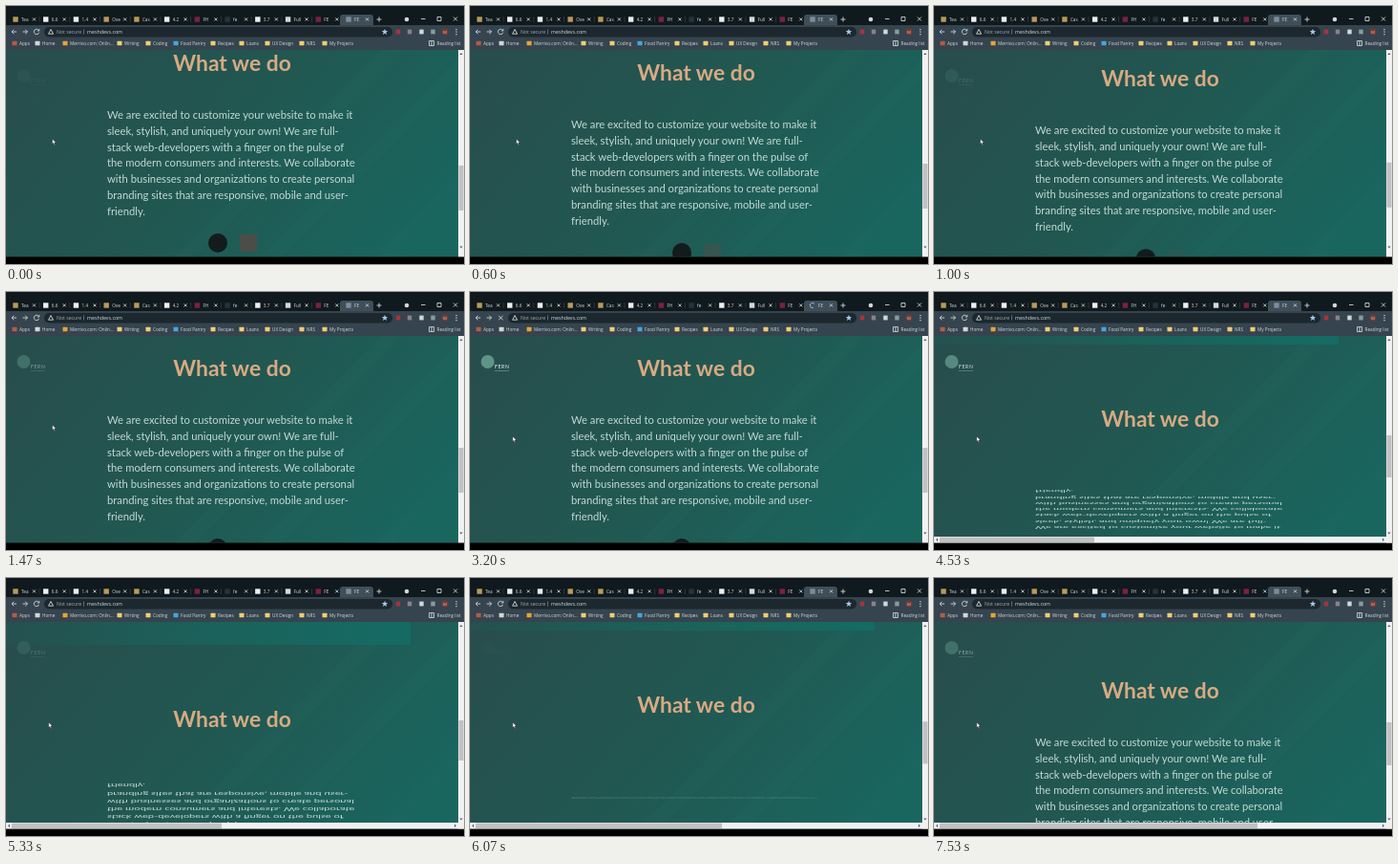
An HTML page for the animation above (7670 ms loop, 480x270 px).

```html
<!DOCTYPE html>
<html lang="en">
<head>
<meta charset="utf-8">
<title>What we do</title>
<style>
html, body { margin: 0; width: 100%; height: 100%; overflow: hidden; background: #000; }
svg { display: block; width: 100vw; height: 100vh; }
text { font-family: Lato, "Open Sans", sans-serif; white-space: pre; }
#chrome text { font: 4.7px "Open Sans", Roboto, sans-serif; fill: #d3dade; }
.line { fill: none; stroke: #cdd5d9; stroke-width: .9; }
</style>
</head>
<body>
<svg viewBox="0 0 480 270">
  <defs>
    <linearGradient id="teal" gradientUnits="userSpaceOnUse" x1="60" y1="20" x2="390" y2="300">
      <stop offset="0" stop-color="#274e4d"/>
      <stop offset=".5" stop-color="#215852"/>
      <stop offset="1" stop-color="#19665f"/>
    </linearGradient>
    <linearGradient id="edge">
      <stop offset="0" stop-color="#156b63" stop-opacity=".1"/>
      <stop offset="1" stop-color="#156b63"/>
    </linearGradient>
    <clipPath id="view"><rect y="46" width="474" height="216.5"/></clipPath>
  </defs>
  <rect width="480" height="270"/>
  <g clip-path="url(#view)">
    <rect y="46" width="474" height="217" fill="url(#teal)"/>
    <path d="M180 270L410 40M270 270L500 40M390 270L500 160" stroke="#2c766b" stroke-width="16" opacity=".12"/>
    <g id="page">
      <rect y="-278" width="424" height="200" fill="url(#edge)"/>
      <text x="237" y="8" text-anchor="middle" font-size="22.8" font-weight="700" fill="#d8aa83">What we do</text>
      <g id="copy" font-size="11.25" fill="#c3d9d5"></g>
      <circle cx="222" cy="188" r="10" fill="#131c1c"/>
      <rect id="badge" x="245" y="179" width="18" height="18" fill="#74403f"/>
    </g>
    <g id="brand">
      <circle cx="18.5" cy="73" r="7" fill="#5f9488"/>
      <text x="26" y="80" font-size="5" letter-spacing=".7" fill="#fff">FERN</text>
      <text x="26" y="82.6" font-size="1.9" fill="#c9dad5">web development</text>
    </g>
  </g>
  <rect x="474" y="46" width="6" height="216.5" fill="#f1f1f1"/>
  <path d="M475.3 51l1.7-2 1.7 2zM475.3 251.5l1.7 2 1.7-2z" fill="#606060"/>
  <rect id="vbar" x="474.5" width="5" fill="#c1c1c1"/>
  <g id="across">
    <rect y="256" width="480" height="6.5" fill="#f1f1f1"/>
    <path d="M4 257.5l-2 1.7 2 1.7zM470 257.5l2 1.7-2 1.7z" fill="#606060"/>
    <rect id="hbar" x="6" y="256.5" height="5.5" fill="#c1c1c1"/>
  </g>
  <g id="chrome">
    <rect width="480" height="20" fill="#10191d"/>
    <rect y="20" width="480" height="26" fill="#35444e"/>
    <path d="M350 20v-8q0-3 3-3h29q3 0 3 3v8z" fill="#3f4f5a"/>
    <rect x="40" y="22" width="365" height="10.5" rx="5" fill="#1c282e"/>
    <path class="line" d="M11 27H6m2.3-2.3L6 27l2.3 2.3M17.5 27h5m-2.3-2.3L22.5 27l-2.3 2.3"/>
    <path id="reload" class="line" d="M34.3 25.5a2.7 2.7 0 1 0 .3 2.3M34.8 24v2h-2"/>
    <path id="stop" class="line" d="M30 24.8l4.5 4.500m0-4.500L30 29.300"/>
    <path class="line" d="M47 24.500l2.500 4.700h-5z" stroke-width=".7"/>
    <text x="53" y="28.900" style="font-size:5.200px;fill:#a4adb2">Not secure</text>
    <path class="line" d="M81.500 24.500v5" style="stroke:#66737a"/>
    <text x="85" y="28.900" style="font-size:5.300px">meshdevs.com</text>
    <path d="M397 23.800l.9 2.200 2.300.1-1.800 1.500.6 2.300-2-1.300-2 1.300.6-2.300-1.800-1.500 2.300-.1z" fill="#a9c9ee"/>
    <path class="line" d="M388.500 14h5m-2.500-2.500v5M435 13.500h4.500M452 11.500h4v4h-4zM469 11.500l4 4m0-4l-4 4"/>
    <circle cx="420" cy="14" r="2.300" fill="#d4d6d9"/>
    <circle cx="460" cy="27" r="3.500" fill="#7a3a30"/>
    <text x="458.200" y="28.500" style="font-size:4px">M</text>
    <path d="M472 24v1.200m0 1.300v1.200m0 1.300v1.200" stroke="#d4d6d9" stroke-width="1.200"/>
    <path class="line" d="M443.500 36.500h5v5h-5zM445 38h2m-2 2h2"/>
    <text x="451.500" y="40.700">Reading list</text>
    <circle id="spinner" class="line" cx="359" cy="14" r="2.600" style="stroke:#9db6cf" stroke-dasharray="11 5.300"/>
  </g>
  <path id="cursor" d="M0 0v5.500l1.300-1.100.9 2 .9-.4-.9-1.900h1.700z" fill="#fff" stroke="#111" stroke-width=".4"/>
</svg>
<script>
const LOOP = 7670;
const $ = id => document.getElementById(id);

function add(parent, tag, attrs, label) {
  const el = document.createElementNS('http://www.w3.org/2000/svg', tag);
  for (const name in attrs) el.setAttribute(name, attrs[name]);
  if (label) el.textContent = label;
  return $(parent).appendChild(el);
}

const copy = [
  'We are excited to customize your website to make it',
  'sleek, stylish, and uniquely your own! We are full-',
  'stack web-developers with a finger on the pulse of',
  'the modern consumers and interests. We collaborate',
  'with businesses and organizations to create personal',
  'branding sites that are responsive, mobile and user-',
  'friendly.'
];
copy.forEach((line, i) => add('copy', 'text', { x: 106, y: 57.7 + i * 16.9 }, line));

const white = '#eceef0', gold = '#b99a58', maroon = '#7a2145';
const tabs = [
  ['Tea', gold], ['6.6', white], ['1.4', white], ['Ove', gold], ['Cas', gold], ['4.2', white],
  ['FH', maroon], ['fe', '#26343a'], ['3.7', white], ['Full', '#d5d8dc'], ['FE', maroon], ['FE', '#7d8c96']
];
tabs.forEach(([label, fill], i) => {
  const x = 10 + i * 31.73;
  const icon = add('chrome', 'rect', { x: x - 2.7, y: 11.3, width: 5.4, height: 5.4, fill });
  if (i === 11) icon.id = 'favicon';
  add('chrome', 'text', { x: x + 6, y: 15.7 }, label);
  add('chrome', 'path', { class: 'line', d: `M${x + 18} 12.4l3 3m0-3l-3 3` });
  if (i < 10) add('chrome', 'path', { d: `M${x + 25} 11v6`, stroke: '#46525a', 'stroke-width': .5 });
});

const marks = [
  [14, 'Apps', '#b55a4c'], [38, 'Home', '#d4d6d9'], [67, 'Merrivo.com: Onlin...', '#e8a23a'],
  [124, 'Writing'], [154, 'Coding'], [183, 'Food Pantry', '#4aa3df'], [222, 'Recipes'],
  [252, 'Loans'], [279, 'UX Design'], [315, 'NRS'], [339, 'My Projects']
];
marks.forEach(([x, label, fill = '#efcf72']) => {
  add('chrome', 'rect', { x: x - 7.5, y: 36.7, width: 5, height: 4.6, rx: .5, fill });
  add('chrome', 'text', { x, y: 40.7 }, label);
});
[[411, '#a8323c'], [423, '#8b8087'], [435.5, '#d4d6d9'], [447.5, '#8d999f']].forEach(([x, fill]) =>
  add('chrome', 'rect', { x: x - 2.2, y: 24.6, width: 4.4, height: 4.8, fill }));

// Linear interpolation through alternating times and values.
function track(t, ...keys) {
  let i = 0;
  while (i + 2 < keys.length && t >= keys[i + 2]) i += 2;
  if (i + 2 >= keys.length) return keys[i + 1];
  const [t0, v0, t1, v1] = keys.slice(i, i + 4);
  return v0 + (v1 - v0) * Math.max(0, (t - t0) / (t1 - t0));
}

const move = (id, value) => $(id).setAttribute('transform', value);
const show = (id, on) => $(id).setAttribute('visibility', on ? 'visible' : 'hidden');

function draw(now) {
  const t = now % LOOP;
  const top = track(t, 0, 60, 600, 70, 1250, 80, 4100, 80, 4530, 133, 5150, 148, 5700, 148, 6450, 118);
  const tilt = track(t, 4100, 0, 4530, 112, 5330, 119, 5800, 112, 7150, 0);
  move('page', `translate(0 ${top})`);
  move('copy', `translate(0 97.3) scale(1 ${Math.cos(tilt * Math.PI / 180)}) translate(0 -97.3)`);
  $('badge').setAttribute('opacity', track(t, 0, .55, 600, .28, 1250, 0));
  $('brand').setAttribute('opacity', track(t, 0, .07, 300, 0, 750, 0, 1470, .48, 2350, 1, 4250, 1,
    4530, .85, 5330, .22, 5700, .03, 6400, .03, 7530, .5));

  $('vbar').setAttribute('y', track(t, 0, 167, 600, 165, 1250, 163, 4100, 163, 4530, 150, 5330, 149, 6450, 151));
  $('vbar').setAttribute('height', track(t, 0, 47, 4100, 47, 4530, 44, 5330, 42, 6450, 45));
  $('hbar').setAttribute('width', track(t, 4200, 142, 4530, 162, 5330, 220, 7530, 333));
  show('across', t >= 4200);

  const loading = t >= 2700 && t < 3600;
  show('stop', loading);
  show('reload', !loading);
  show('spinner', loading);
  show('favicon', !loading);
  move('spinner', `rotate(${t * .36} 359 14)`);
  move('cursor', `translate(${track(t, 2550, 48.5, 3100, 44.7)} ${track(t, 2550, 139, 3100, 151)})`);
}

const start = performance.now();
function tick() {
  draw(performance.now() - start);
  requestAnimationFrame(tick);
}
tick();
</script>
</body>
</html>
```
